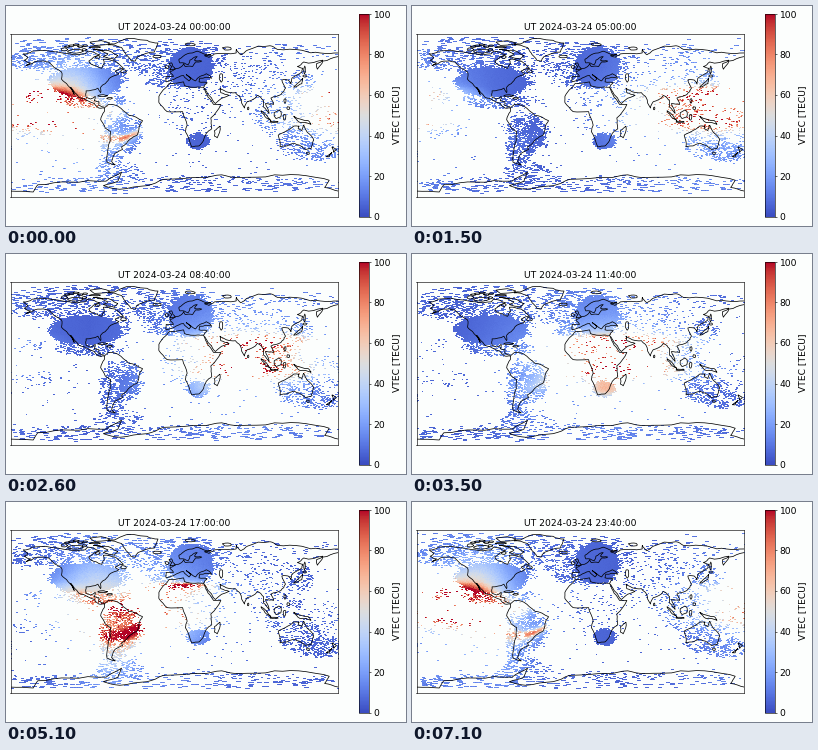
A matplotlib script that plays this animation: 400 by 220 pixels, repeating every 7200 ms.

```python
import numpy as np
import matplotlib.pyplot as plt
from matplotlib.animation import FuncAnimation
from matplotlib.collections import LineCollection

W, H, DPI = 400, 220, 100
FRAMES, STEP_MIN = 72, 20
PAPER = "#fcfefd"
FONT = 9.2 * 72 / DPI
THIN = 0.6 * 72 / DPI
plt.rcParams["font.family"] = "DejaVu Sans"

rough = np.random.default_rng(4)
lines = []


def roughen(pts, amount):
    """Insert displaced midpoints so long edges look like coast."""
    a, b = pts[:-1], pts[1:]
    d = b - a
    normal = np.column_stack([-d[:, 1], d[:, 0]])
    mid = (a + b) / 2 + normal * rough.uniform(-amount, amount, (len(a), 1))
    out = np.empty((2 * len(a) + 1, 2))
    out[::2], out[1::2] = pts, mid
    return out


def coast(*xy, amount=0.1):
    """Trace a shore through longitude, latitude pairs."""
    pts = np.reshape(xy, (-1, 2)).astype(float)
    lines.append(roughen(roughen(pts, amount), amount))


def isle(x, y, rx, ry):
    turn = np.linspace(0, 2 * np.pi, 10)
    r = rough.uniform(0.8, 1.2, 10)
    r[-1] = r[0]
    lines.append(np.column_stack([x + rx * r * np.cos(turn),
                                  y + ry * r * np.sin(turn)]))


def north_america():
    coast(-156, 71, -166, 68, -161, 64, -165, 61, -158, 58, -163, 55,
          -150, 60, -138, 59, -124, 48, -124, 40, -117, 33, -110, 23,
          -114, 31, -105, 20, -95, 16, -83, 8, -77, 8)
    coast(-77, 9, -83, 11, -83, 15, -88, 16, -87, 21, -92, 18, -97, 20,
          -97, 27, -84, 30, -81, 25, -81, 31, -76, 35, -70, 42, -61, 46,
          -65, 49, -56, 52, -65, 60, -78, 62, -77, 57, -80, 52, -92, 57,
          -94, 60, -82, 67, -95, 71, -98, 68, -115, 68, -128, 70, -156, 71)
    coast(-62, 66, -77, 72, -89, 73, -73, 68, -78, 65, -66, 62, -62, 66)
    coast(-73, 78, -58, 75, -53, 67, -48, 61, -43, 60, -40, 65, -22, 70,
          -18, 80, -30, 83, -60, 82, -73, 78)


def south_america():
    coast(-77, 8, -72, 12, -62, 10, -50, 0, -35, -6, -39, -14, -41, -22,
          -48, -26, -58, -35, -57, -38, -65, -42, -69, -51, -65, -55,
          -74, -52, -73, -38, -70, -18, -76, -14, -81, -5, -77, 4, -77, 8,
          amount=0.07)


def africa():
    coast(-6, 35, 10, 37, 11, 33, 20, 31, 32, 31, 37, 20, 43, 12, 51, 12,
          40, -3, 41, -15, 35, -20, 32, -28, 27, -34, 19, -35, 12, -18,
          14, -11, 9, 4, -8, 4, -17, 14, -17, 21, -10, 30, -6, 35,
          amount=0.06)
    coast(50, -12, 47, -25, 44, -23, 44, -17, 50, -12)


def europe():
    coast(32, 31, 36, 36, 27, 37, 28, 41, 41, 41, 35, 46, 28, 43, 23, 38,
          13, 45, 18, 40, 16, 38, 10, 44, 0, 40, -9, 37, -9, 43, -1, 43,
          -5, 48, 8, 54, 10, 57, 12, 54, 20, 54, 23, 59, 30, 60, 22, 61,
          25, 65, 17, 61, 15, 56, 6, 58, 5, 62, 14, 68, 25, 71, 40, 67,
          33, 66, 38, 64, 44, 68, 68, 69)
    coast(-5, 50, 1, 51, -3, 58, -6, 57, -3, 54, -5, 50)


def asia():
    coast(68, 69, 68, 73, 73, 67, 80, 72, 105, 77, 113, 73, 140, 72,
          160, 69, 180, 69)
    coast(180, 65, 163, 60, 157, 51, 156, 57, 163, 61, 142, 59, 135, 54,
          141, 52, 140, 48, 129, 41, 128, 35, 125, 39, 118, 39, 122, 30,
          117, 23, 106, 19, 109, 12, 100, 13, 104, 2, 98, 9, 98, 16,
          91, 22, 80, 15, 77, 8, 72, 20, 67, 25, 57, 26, 50, 30, 51, 25,
          60, 22, 45, 13, 39, 21, 33, 30)
    coast(141, 41, 140, 35, 131, 31, 136, 36, 141, 41)
    coast(95, 5, 106, -6, 101, -3, 95, 5)
    coast(131, -1, 147, -6, 150, -10, 138, -8, 131, -1)


def oceania():
    coast(142, -11, 146, -19, 153, -27, 150, -37, 144, -38, 137, -33,
          131, -31, 116, -35, 114, -22, 122, -18, 131, -12, 137, -12,
          136, -15, 140, -17, 142, -11, amount=0.07)
    coast(173, -35, 178, -38, 175, -41, 173, -35)
    coast(173, -41, 170, -46, 167, -46, 173, -41)


def antarctica():
    coast(-180, -84, -155, -85, -150, -77, -115, -74, -75, -73, -58, -63,
          -62, -73, -78, -78, -60, -82, -30, -78, -12, -71, 30, -69,
          52, -66, 70, -69, 110, -66, 145, -67, 170, -72, 165, -80,
          180, -84, amount=0.05)


def islands():
    isle(-109, 71, 8, 2.2)
    isle(-121, 73, 4, 1.5)
    isle(-87, 75.5, 6, 0.8)
    isle(-82, 80, 10, 2.6)
    isle(-99, 72.5, 2.5, 1.2)
    for k in range(5):
        isle(-118 + 5 * k, 76 + k % 3, 3, 0.8)
    isle(-84, 64.5, 3, 1.3)
    isle(-56, 48.7, 3, 1.8)
    isle(-79, 21.7, 5, 0.9)
    isle(-71, 18.8, 3, 0.9)
    isle(-19, 65, 5, 1.5)
    isle(-8, 53.3, 2, 1.7)
    isle(17, 78.5, 6, 1.5)
    isle(58, 74, 5, 2)
    isle(51, 42, 2, 5)
    isle(81, 7.5, 0.9, 1.5)
    isle(121.5, 16, 1.2, 2.5)
    isle(125, 7.8, 1.6, 1.7)
    isle(121, -2, 1.6, 3)
    isle(110, -7.3, 4.5, 0.6)
    isle(114, 1, 4, 4.5)
    isle(146.7, -42, 1.6, 1.2)
    isle(143, 50, 0.8, 4)
    isle(143, 43.4, 2, 1.2)


for land in (north_america, south_america, africa, europe, asia, oceania,
             antarctica, islands):
    land()

# Receiver coverage: lon, lat, half width, half height, density
COVER = [
    (-98, 37, 38, 16, 2.6), (-100, 29, 24, 9, 1.6), (17, 53, 24, 22, 2.6),
    (-100, 60, 50, 17, .45), (-155, 63, 32, 13, .6), (-100, 76, 80, 11, .3),
    (-75, 42, 24, 18, .6), (-90, 17, 38, 9, .5), (5, 60, 55, 22, .4),
    (5, 37, 35, 8, .5), (-56, -20, 20, 22, .85), (-52, -22, 12, 12, 1.3),
    (-68, -30, 14, 32, .6), (-62, -64, 26, 13, .4), (25, -28, 12, 9, 1.7),
    (25, 5, 40, 34, .07), (75, 40, 60, 26, .13), (138, 37, 14, 14, .35),
    (112, 3, 28, 24, .18), (137, -28, 26, 18, .35), (158, -39, 26, 11, .55),
    (165, -12, 20, 22, .14), (-155, 20, 11, 7, .2), (-155, -16, 28, 9, .13),
    (0, -76, 185, 9, .26), (-130, -78, 55, 7, .35), (110, 70, 75, 9, .12),
]

lon, lat = np.meshgrid(np.arange(-179.5, 180), np.arange(-89.5, 90))


def bell(x, mid, width):
    return np.exp(-((x - mid) / width) ** 2)


def coverage():
    total = np.full(lon.shape, 0.009)
    for x, y, rx, ry, p in COVER:
        r = np.hypot((lon - x) / rx, (lat - y) / ry)
        total = np.maximum(total, p * np.clip((1.15 - r) / 0.3, 0, 1))
    return total


DENSITY = coverage()
STREAK = np.select([abs(lat) > 74, abs(lat) > 58], [5, 3], 2)
MAG_LAT = lat - (8 - 20 * bell(lon, -65, 35))
AMERICA = bell(lon, -88, 42)
WAVES = np.random.default_rng(9).uniform(-1, 1, (6, 3))


def sahara(ut):
    return bell(lat, 28.5, 3) * bell(lon, 10, 28) * bell(ut, 17, 1.3)


def vtec(ut):
    """Electron content from local time and magnetic latitude."""
    dt = (ut + lon / 15 - 2.5) % 24 - 12
    day = bell(dt, 0, np.where(dt < 0, 5.5, 4))
    late = bell(dt, 0, np.where(dt < 0, 5.5, 6))
    value = 4 + 8 * bell(dt, 0, 9) + 11 * day * np.cos(np.radians(lat))
    value += 60 * day * bell(MAG_LAT, 0, 24 + 29 * AMERICA)
    value += 42 * late * bell(abs(MAG_LAT), 16, 8)
    # evening crest over South America
    value += 50 * bell(MAG_LAT, -14, 3.5) * bell(dt, 6, 2) * bell(lon, -52, 22)
    # southern Africa at noon
    value += 42 * day ** 2 * bell(lon, 25, 20) * bell(lat, -28, 11)
    return value + 55 * sahara(ut)


def sample(i):
    """Observed cells at one time step; the rest stay masked."""
    rng = np.random.default_rng(100 + i)
    ut = i * STEP_MIN / 60
    phase = 2 * np.pi * i / FRAMES
    patch = sum(np.sin(0.45 * kx * lon + 0.6 * ky * lat
                       + 6 * p + round(9 * p) * phase)
                for kx, ky, p in WAVES) / 3
    chance = (DENSITY + 0.5 * sahara(ut)) * (1 + 0.7 * patch)
    chance = np.where(DENSITY > 1, DENSITY, chance)
    start = rng.random(lon.shape) < chance / STREAK
    seen = start.copy()
    for k in range(1, 5):
        seen |= np.roll(start & (STREAK > k), k, axis=1)
    seen |= rng.random(lon.shape) < np.clip(DENSITY - 1, 0, 1)
    seen &= abs(lat) < 87
    spread = np.where(DENSITY > 1, 0.03, 0.13)
    value = vtec(ut) * (1 + spread * rng.standard_normal(lon.shape))
    return np.ma.masked_where(~seen, value)


def stamp(i):
    minutes = i * STEP_MIN
    return f"UT 2024-03-24 {minutes // 60:02d}:{minutes % 60:02d}:00"


def box(x0, y0, x1, y1):
    return fig.add_axes([x0 / W, 1 - y1 / H, (x1 - x0) / W, (y1 - y0) / H])


fig = plt.figure(figsize=(W / DPI, H / DPI), dpi=DPI, facecolor=PAPER)
ax = box(4.5, 28, 332.3, 190.5)
ax.set_facecolor(PAPER)
image = ax.imshow(sample(0), cmap="coolwarm", vmin=0, vmax=100,
                  origin="lower", extent=(-180, 180, -90, 90),
                  aspect="auto", interpolation="nearest")
ax.add_collection(LineCollection(lines, colors="black",
                                 linewidths=0.75 * 72 / DPI, zorder=3))
ax.set(xlim=(-180, 180), ylim=(-90, 90), xticks=[], yticks=[])
for spine in ax.spines.values():
    spine.set_linewidth(THIN)

bar = fig.colorbar(image, cax=box(353, 8, 363.3, 210.5))
bar.set_ticks(range(0, 101, 20))
bar.outline.set_linewidth(THIN)
bar.ax.tick_params(labelsize=FONT, length=1.6, width=THIN, pad=1.5)
fig.text(391 / W, 1 - 109 / H, "VTEC [TECU]", fontsize=FONT, rotation=90,
         ha="center", va="center")
title = fig.text(168.4 / W, 1 - 24.3 / H, stamp(0), fontsize=FONT,
                 ha="center", va="baseline")


def draw(i):
    image.set_data(sample(i))
    title.set_text(stamp(i))
    return image, title


anim = FuncAnimation(fig, draw, frames=FRAMES, interval=100,
                     init_func=lambda: draw(0), repeat=True, repeat_delay=0)
plt.show()
```
